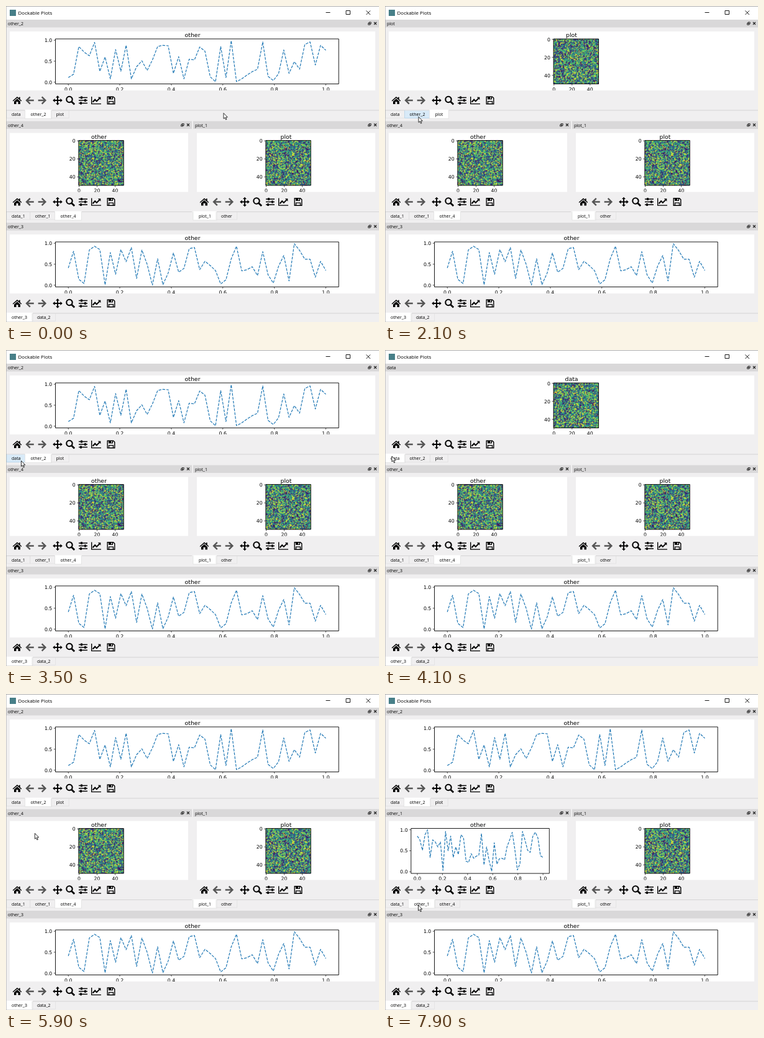
An HTML page with a canvas that plays this animation: 600x509 px, repeating every 8000 ms.

```html
<!DOCTYPE html>
<html lang="en">
<head>
<meta charset="utf-8">
<title>Dockable Plots</title>
<style>
  html, body { margin: 0; width: 100%; height: 100%; overflow: hidden; background: #f0eff0; }
  canvas { display: block; width: 600px; height: 509px; }
</style>
</head>
<body>
<canvas id="stage" width="600" height="509"></canvas>
<script>
const ctx = document.getElementById('stage').getContext('2d');
const LOOP = 8000, STEP = 100;
const UI_FONT = '"Open Sans", "Noto Sans", sans-serif';
const PLOT_FONT = '"DejaVu Sans", sans-serif';
const AXES_HEIGHT = 72.5;

// Line plots, in percent of the y axis
const LINES = {
  other_1: [85, 76, 51, 88, 100, 34, 76, 71, 59, 71, 3, 96, 50, 85, 34, 59, 41, 88, 81, 25, 22, 43, 32, 37, 40,
    91, 16, 59, 26, 1, 69, 18, 31, 32, 28, 60, 76, 94, 54, 4, 19, 96, 75, 51, 46, 84, 94, 81, 38, 34],
  other_2: [11, 19, 85, 72, 63, 95, 26, 60, 8, 78, 26, 88, 8, 37, 51, 28, 53, 85, 88, 87, 21, 61, 8, 55, 53,
    84, 74, 13, 1, 85, 11, 99, 1, 8, 17, 25, 31, 96, 14, 4, 20, 77, 21, 49, 31, 90, 96, 41, 88, 76],
  other_3: [41, 81, 14, 4, 84, 93, 85, 1, 78, 26, 85, 56, 90, 16, 84, 50, 0, 63, 1, 29, 77, 31, 40, 87, 90,
    37, 57, 47, 35, 3, 13, 63, 93, 34, 37, 44, 23, 80, 25, 5, 45, 71, 10, 99, 83, 62, 62, 19, 57, 35]
};

// Selected tab of each dock as [time, name] changes
const DOCKS = [
  { x: 0, y: 22, w: 600, tabs: ['data', 'other_2', 'plot'],
    picks: [[0, 'other_2'], [1500, 'plot'], [3100, 'other_2'], [3900, 'data'], [5500, 'other_2']] },
  { x: 0, y: 185.5, w: 299, tabs: ['data_1', 'other_1', 'other_4'], picks: [[0, 'other_4'], [6900, 'other_1']] },
  { x: 301, y: 185.5, w: 299, tabs: ['plot_1', 'other'], picks: [[0, 'plot_1']] },
  { x: 0, y: 349, w: 600, tabs: ['other_3', 'data_2'], picks: [[0, 'other_3']] }
];

// Pointer path: time, x, y
const POINTER = [
  [0, 350, 172.5], [200, 325, 165], [400, 325, 165], [900, 140, 158], [1200, 86, 169.5], [1500, 85, 170],
  [1900, 56, 180], [2100, 54, 178.5], [3000, 51.5, 176.5], [3200, 51.5, 176.5], [3400, 36, 184],
  [3600, 13, 173], [3700, 13, 173], [4100, 11, 171], [4600, 30, 264], [4900, 34, 278], [5300, 36.5, 177.5],
  [5500, 44, 174], [5700, 44, 174], [6200, 50, 300], [6600, 55.5, 336.5], [7000, 55, 337],
  [7300, 50, 347], [7600, 45.5, 336], [7900, 53.5, 340], [8000, 53.5, 340]
];

function pointerAt(t) {
  const i = POINTER.findIndex(p => p[0] > t);
  const [t0, x0, y0] = POINTER[i - 1], [t1, x1, y1] = POINTER[i];
  const k = (t - t0) / (t1 - t0);
  return [x0 + (x1 - x0) * k, y0 + (y1 - y0) * k];
}

function rect(x, y, w, h, color) {
  ctx.fillStyle = color;
  ctx.fillRect(x, y, w, h);
}

function text(str, x, y, size, family, align = 'left', color = '#000') {
  ctx.font = `${size}px ${family}`;
  ctx.textAlign = align;
  ctx.fillStyle = color;
  ctx.fillText(str, x, y);
}

function stroke(path, width, color = '#000') {
  ctx.lineWidth = width;
  ctx.strokeStyle = color;
  ctx.stroke(new Path2D(path));
}

function fill(path, color = '#000') {
  ctx.fillStyle = color;
  ctx.fill(new Path2D(path));
}

function at(x, y, draw) {
  ctx.save();
  ctx.translate(x, y);
  draw();
  ctx.restore();
}

const VIRIDIS = [[68, 1, 84], [59, 82, 139], [33, 145, 140], [94, 201, 98], [253, 231, 37]];

function noiseImage(seed) {
  const n = 50, canvas = document.createElement('canvas');
  canvas.width = canvas.height = n;
  const c = canvas.getContext('2d');
  for (let i = 0; i < n * n; i++) {
    seed = (Math.imul(seed, 1664525) + 1013904223) >>> 0;
    const v = seed / 2 ** 32 * 4, k = Math.floor(v), f = v - k;
    c.fillStyle = `rgb(${VIRIDIS[k].map((a, j) => Math.round(a + (VIRIDIS[k + 1][j] - a) * f))})`;
    c.fillRect(i % n, Math.floor(i / n), 1, 1);
  }
  return canvas;
}

const IMAGES = { data: noiseImage(11), plot: noiseImage(222), other_4: noiseImage(3333), plot_1: noiseImage(44444) };

const ARROW = 'M6.3 0H-5M.3 -5.6L-5.4 0L.3 5.6';
const ICONS = [
  [18, () => {
    fill('M-7.3 .5L0 -6L2.8 -3.5V-5.3H4.7V-1.8L7.3 .5L6.4 1.6L0 -4L-6.4 1.6Z');
    fill('M-5 1.7L0 -2.8L5 1.7V6H1.5V2.3H-1.5V6H-5Z');
  }],
  [38.5, () => stroke(ARROW, 2.4, '#555')],
  [58, () => { ctx.scale(-1, 1); stroke(ARROW, 2.4, '#555'); }],
  [83, () => {
    stroke('M-6 0H6M0 -6V6', 1.9);
    for (let i = 0; i < 4; i++) { ctx.rotate(Math.PI / 2); fill('M0 -7.8L3 -4.4H-3Z'); }
  }],
  [103.5, () => {
    stroke('M3.2 -1.5A4.7 4.7 0 1 1 -6.2 -1.5A4.7 4.7 0 1 1 3.2 -1.5', 2.1);
    stroke('M2 2L6.6 6.6', 2.8);
  }],
  [124, () => {
    stroke('M-7 -4.5H7M-7 0H7M-7 4.5H7', 1.5);
    stroke('M-2.5 -6.4V-2.6M3.5 -1.9V1.9M-3.5 2.6V6.4', 2.8);
  }],
  [145, () => {
    stroke('M-7.3 -6V5.6H8', 1.4);
    stroke('M-5.5 2.8L-1.8 -1.2L.8 1.4L5.8 -3.6', 2);
    fill('M2.8 -5.3H7.3V-.8Z');
  }],
  [169, () => {
    stroke('M-5.8 -5.8H3.6L5.8 -3.6V5.8H-5.8Z', 1.4);
    fill('M-4 -6H3V-1.6H-4Z');
    stroke('M.8 -5V-2.7', 1.5, '#fff');
    stroke('M-3.5 5.6V1.6H3.5V5.6', 1.3);
  }]
];

function drawAxes(left, top, width, xTicks, yTicks) {
  const bottom = top + AXES_HEIGHT;
  for (const [x, label] of xTicks) {
    stroke(`M${x} ${bottom}v2.7`, 0.65);
    text(label, x, bottom + 11, 7.8, PLOT_FONT, 'center');
  }
  for (const [y, label] of yTicks) {
    stroke(`M${left} ${y}h-2.7`, 0.65);
    text(label, left - 5.2, y + 2.9, 7.8, PLOT_FONT, 'right');
  }
  stroke(`M${left} ${top}h${width}V${bottom}h${-width}Z`, 0.9);
}

function drawPlot(name, dock) {
  const { x, y, w } = dock, figure = w - 12;
  const left = x + 6 + figure * 0.125, width = figure * 0.775, top = y + 31;
  rect(x + 6, y + 19, figure, 95, '#fff');
  ctx.save();
  ctx.beginPath();
  ctx.rect(x + 6, y + 19, figure, 95);
  ctx.clip();
  if (LINES[name]) {
    const px = v => left + width * (v + 0.05) / 1.1;
    const py = v => y + 100.7 - 67.5 * v;
    const points = LINES[name].map((v, i) => `${px(i / 49)} ${py(v / 100)}`);
    ctx.setLineDash([4.35, 1.88]);
    ctx.lineJoin = 'round';
    stroke('M' + points.join('L'), 1.2, '#1f77b4');
    ctx.setLineDash([]);
    ctx.lineJoin = 'miter';
    drawAxes(left, top, width,
      [0, 0.2, 0.4, 0.6, 0.8, 1].map(v => [px(v), v.toFixed(1)]),
      [0, 0.5, 1].map(v => [py(v), v.toFixed(1)]));
  } else {
    const side = AXES_HEIGHT, imageLeft = left + (width - side) / 2;
    const offset = v => (v + 0.5) * side / 50;
    ctx.drawImage(IMAGES[name], imageLeft, top, side, side);
    drawAxes(imageLeft, top, side,
      [0, 20, 40].map(v => [imageLeft + offset(v), v]),
      [0, 20, 40].map(v => [top + offset(v), v]));
  }
  text(name.split('_')[0], x + w / 2, y + 28, 9.4, PLOT_FONT, 'center');
  ctx.restore();
}

function drawTabs(dock, selected, [mx, my]) {
  const y = dock.y + 146, h = 13.5;
  rect(dock.x, y - 0.5, dock.w, 1, '#d5d4d5');
  let x = dock.x + 1;
  for (const name of dock.tabs) {
    ctx.font = `7px ${UI_FONT}`;
    const w = ctx.measureText(name).width + 16;
    const active = name === selected;
    const hover = mx >= x && mx < x + w && my >= y && my < y + h;
    if (active) {
      rect(x - 1, y - 1, w + 2, h + 1, '#fff');
      stroke(`M${x - 1} ${y}v${h}h${w + 2}v${-h}`, 0.6, '#d9d9d9');
    } else {
      if (hover) rect(x, y + 0.5, w, h - 1, '#d8eaf8');
      stroke(`M${x} ${y}v${h - 1}h${w}v${1 - h}`, 0.6, hover ? '#a9cde6' : '#dcdcdc');
    }
    text(name, x + 8, y + 9.2, 7, UI_FONT);
    x += w;
  }
}

function drawDock(dock, t, pointer) {
  const { x, y, w } = dock;
  const selected = dock.picks.filter(p => p[0] <= t).pop()[1];
  rect(x, y, w, 12.5, '#d9d8d9');
  text(selected, x + 3, y + 9, 7, UI_FONT);
  at(x + w - 15, y + 6, () => stroke('M-1 -2H2.2V.8H-1ZM-2.4 -.3H.8V2.3H-2.4Z', 0.9, '#222'));
  at(x + w - 6, y + 6, () => stroke('M-2 -2L2 2M2 -2L-2 2', 1.1, '#222'));
  drawPlot(selected, dock);
  for (const [ix, icon] of ICONS) at(x + ix, y + 130, icon);
  drawTabs(dock, selected, pointer);
}

function drawTitleBar() {
  rect(0, 0, 600, 22, '#fff');
  rect(0, 0, 600, 0.7, '#8c8c8c');
  rect(6, 6, 10, 10, '#477f88');
  text('Dockable Plots', 19.5, 13.7, 8, UI_FONT);
  stroke('M514.5 10.5H521.5M547 7.5H553.5V13.5H547ZM579.5 7.5L586 14M586 7.5L579.5 14', 0.9);
}

function drawPointer([x, y]) {
  at(x, y, () => {
    const shape = 'M0 0V9L2 7.2L3.5 10.6L5 10L3.5 6.6H6.4Z';
    fill(shape, '#fff');
    stroke(shape, 0.8);
  });
}

function draw(t) {
  const pointer = pointerAt(t);
  rect(0, 0, 600, 509, '#f0eff0');
  for (const dock of DOCKS) drawDock(dock, t, pointer);
  drawTitleBar();
  rect(0, 0, 0.6, 509, '#a8a8a8');
  drawPointer(pointer);
}

const start = performance.now();

function tick() {
  const t = Math.max(0, performance.now() - start) % LOOP;
  draw(Math.floor(t / STEP) * STEP);
  requestAnimationFrame(tick);
}
tick();
</script>
</body>
</html>
```
